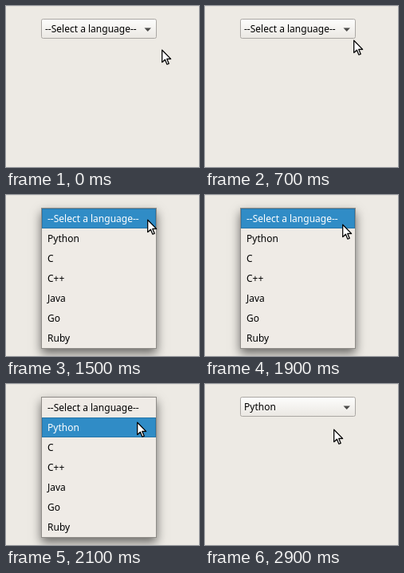
These frames come from a looping animation (242 by 202 pixels, 4.5 s). An HTML page:

```html
<!DOCTYPE html>
<html lang="en">
<head>
<meta charset="utf-8">
<title>Language menu</title>
<style>
  html, body { margin: 0; width: 100%; height: 100%; overflow: hidden; background: #edeae4; }
  #stage { position: relative; width: 242px; height: 202px; overflow: hidden;
    font: 12px/25px "Noto Sans", sans-serif; color: #000; white-space: pre; }
  #stage::before { content: ""; position: absolute; inset: 0 0 auto; height: 1px; background: #e4e1db; }
  #stage > * { position: absolute; box-sizing: border-box; }
  #combo { left: 44px; top: 16px; width: 145px; height: 25px; padding-left: 4px; line-height: 23px;
    border: 1px solid #aaa7a3; border-radius: 2.5px; background: linear-gradient(#fdfdfc, #ebe8e3); }
  #combo.hover { background: linear-gradient(#fff, #f5f3f0); }
  #combo svg { position: absolute; left: 128px; top: 10px; }
  #popup { left: 44px; top: 16px; width: 145px; height: 177px; border: 1px solid #8f8c88;
    background: #efebe6; box-shadow: 0 6px 12px rgba(0, 0, 0, .55); }
  #popup div { box-sizing: border-box; height: 25px; padding-left: 7px; }
  #popup .active { color: #fff; background: #308cc6; box-shadow: inset 0 0 0 1px #2877aa; }
  #cursor { left: 0; top: 0; overflow: visible; }
</style>
</head>
<body>
<div id="stage">
  <div id="combo"><span id="value"></span><svg width="10" height="6"><path d="M.5 .5H9L4.75 5Z" fill="#4b4a48"/></svg></div>
  <div id="popup"></div>
  <svg id="cursor" width="14" height="22">
    <path d="M1.6 2V17.6L5.2 14.2L7.7 20L10.2 18.9L7.7 13.4H12.6Z" fill="#000" opacity=".18"/>
    <path d="M.7 1.2V16.6L4.4 13.2L6.9 19.2L9.2 18.2L6.8 12.4H11.6Z"
      fill="#fff" stroke="#000" stroke-width="1.25" stroke-linejoin="round"/>
  </svg>
</div>
<script>
const LOOP = 4500, OPEN = 1500, CLOSE = 2900;
const languages = ["--Select a language--", "Python", "C", "C++", "Java", "Go", "Ruby"];
const [combo, value, popup, cursor] =
  ["combo", "value", "popup", "cursor"].map(id => document.getElementById(id));

const items = languages.map(name => {
  const item = document.createElement("div");
  item.textContent = name;
  popup.append(item);
  return item;
});

// Pointer tip [time, x, y], held until the next step.
const path = [[0, 195, 54]];
for (let i = 1; i <= 6; i++) path.push([400 + i * 100, 195 - 3 * i, 54 - 4 * i]);
path.push([1900, 172, 36], [2000, 166, 42], [2100, 164, 47], [2200, 163, 51], [2300, 161, 56]);

function render(t) {
  const [, x, y] = path.findLast(step => step[0] <= t);
  const open = t >= OPEN && t < CLOSE;
  const row = Math.floor((y - 17) / 25);
  cursor.style.transform = `translate(${x}px, ${y}px)`;
  popup.style.visibility = open ? "visible" : "hidden";
  combo.style.visibility = open ? "hidden" : "visible";
  combo.classList.toggle("hover", x < 189 && y < 41);
  value.textContent = languages[t < CLOSE ? 0 : 1];
  items.forEach((item, i) => item.classList.toggle("active", i === row));
}

const start = performance.now();
function tick() {
  render((performance.now() - start) % LOOP);
  requestAnimationFrame(tick);
}
tick();
</script>
</body>
</html>
```
